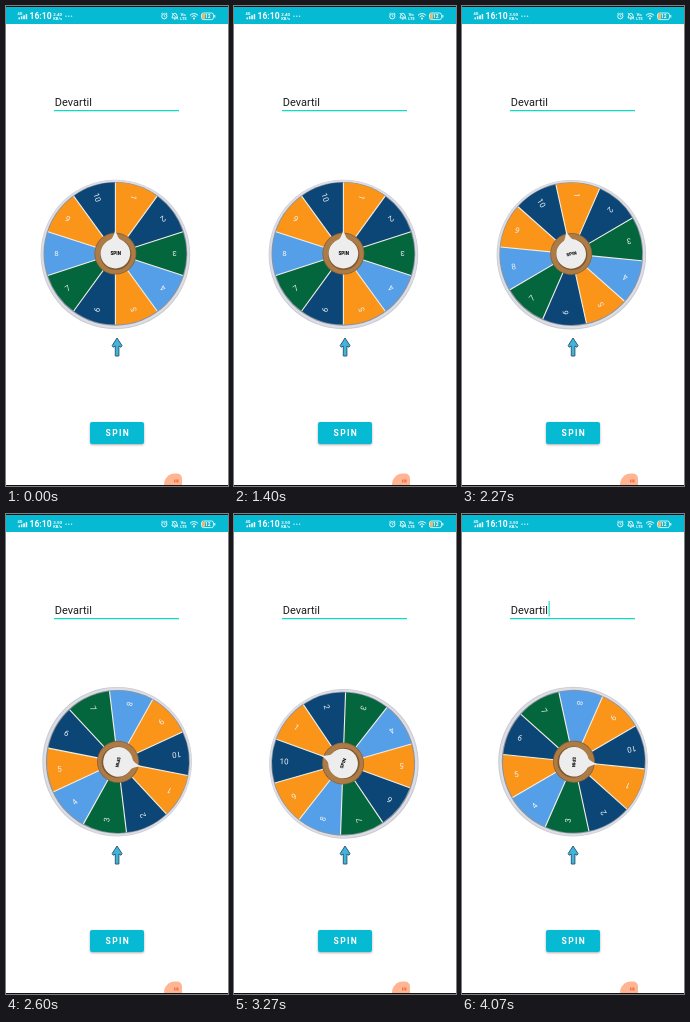
Animation, 222 px wide and 480 px high, one loop 4140 ms. Source, as an HTML page with a canvas:

```html
<!DOCTYPE html>
<html lang="en">
<head>
<meta charset="utf-8">
<title>Spin wheel</title>
<style>
  html, body { margin: 0; width: 100%; height: 100%; overflow: hidden; background: #fff; }
  canvas { display: block; width: 222px; height: 480px; }
</style>
</head>
<body>
<canvas id="stage"></canvas>
<script>
const W = 222, H = 480, LOOP = 4140, FPS = 15;
const CYAN = '#06bad4', TEAL = '#12d8c6';
const ORANGE = '#fa9519', NAVY = '#0b4676', GREEN = '#04663c', SKY = '#559fe8';
const SLICES = [ORANGE, NAVY, GREEN, SKY, ORANGE, NAVY, GREEN, SKY, ORANGE, NAVY];
const TAU = Math.PI * 2, RAD = Math.PI / 180;

const canvas = document.getElementById('stage');
const c = canvas.getContext('2d');
const dpr = window.devicePixelRatio || 1;
canvas.width = W * dpr;
canvas.height = H * dpr;

function disc(x, y, r, fill) {
  c.beginPath();
  c.arc(x, y, r, 0, TAU);
  c.fillStyle = fill;
  c.fill();
}

function rect(x, y, w, h, fill, r = 0) {
  c.beginPath();
  c.roundRect(x, y, w, h, r);
  c.fillStyle = fill;
  c.fill();
}

function line(points, stroke, width) {
  c.beginPath();
  points.forEach(([x, y]) => c.lineTo(x, y));
  c.strokeStyle = stroke;
  c.lineWidth = width;
  c.stroke();
}

function arc(x, y, r, from, to, stroke, width) {
  c.beginPath();
  c.arc(x, y, r, from * RAD, to * RAD);
  c.strokeStyle = stroke;
  c.lineWidth = width;
  c.stroke();
}

function text(str, x, y, size, fill, { weight = 400, align = 'left', gap = 0, base = 'alphabetic' } = {}) {
  c.font = `${weight} ${size}px Roboto, sans-serif`;
  c.textAlign = align;
  c.textBaseline = base;
  c.letterSpacing = gap + 'px';
  c.fillStyle = fill;
  c.fillText(str, x, y);
}

function statusBar(t) {
  const white = '#fff';
  rect(0, 0, W, 18, CYAN);
  rect(0, 0, W, 1, '#111');
  text('4G', 11.5, 9, 4, white, { weight: 700 });
  for (let i = 0; i < 4; i++) rect(12.5 + i * 2.4, 11.4 - i * 1.1, 1.5, 1.8 + i * 1.1, white);
  text('16:10', 23.5, 13.3, 8.6, white, { weight: 700 });
  text(t < 2000 ? '2.40' : '3.50', 47.3, 9.6, 4.4, white, { weight: 700 });
  text('KB/s', 47.3, 13.6, 4, white, { weight: 700 });
  for (let i = 0; i < 3; i++) disc(60 + i * 2.8, 10.2, 0.65, white);

  // alarm
  arc(158.3, 10.3, 2.6, 0, 360, white, 0.9);
  line([[158.3, 8.8], [158.3, 10.5], [159.5, 10.9]], white, 0.7);
  line([[155.3, 8], [156.7, 6.8]], white, 0.8);
  line([[161.3, 8], [159.9, 6.8]], white, 0.8);
  // muted bell
  c.beginPath();
  c.arc(168.8, 9.5, 2.1, Math.PI, 0);
  c.lineTo(171.6, 12);
  c.lineTo(166, 12);
  c.closePath();
  c.strokeStyle = white;
  c.lineWidth = 0.9;
  c.stroke();
  disc(168.8, 13, 0.8, white);
  line([[165.8, 7], [172.2, 13.5]], white, 0.8);
  // call over data
  text('Vo', 174.5, 9.6, 4.4, white, { weight: 700 });
  text('LTE', 174.3, 13.6, 4, white, { weight: 700 });
  // wifi
  arc(188, 13, 5.4, 222, 318, white, 1);
  arc(188, 13, 3.2, 222, 318, white, 1);
  disc(188, 12.6, 1, white);
  // battery
  c.beginPath();
  c.roundRect(195.5, 7, 12, 6.6, 2);
  c.strokeStyle = white;
  c.lineWidth = 0.8;
  c.stroke();
  rect(196.1, 7.6, 3, 5.4, '#f5b866', 1);
  rect(208.3, 9, 1, 2.6, white);
  text('12', 201.8, 12.1, 5, white, { weight: 700, align: 'center' });
}

function nameField(t) {
  text('Devartil', 48.7, 100, 11, '#1c1c1c');
  rect(48, 104, 125, 1.2, TEAL);
  const blink = Math.floor((t - 465) / 535);
  if (!(blink & 1)) rect(86.6, 87, 1.1, 15.5, TEAL);
}

// Decelerating 3.6 s spin, with a short stutter around t = 3000.
function wheelAngle(t) {
  if (t <= 1470) return 0;
  const u = Math.min((t - 1470) / 3600, 1);
  const lag = 20 * Math.exp(-(((t - 3000) / 390) ** 2));
  return 884.5 * (1 - (1 - u) ** 2) - lag;
}

function wheel(t) {
  c.save();
  c.translate(110.6, 248.8);
  c.rotate(wheelAngle(t) * RAD);
  c.translate(-1.2, -1.2);

  // rim, a little lower than the slices
  disc(0, 0.9, 74.8, '#cbccd4');
  disc(0, 0.5, 74, '#dcdde5');
  disc(0, 0.2, 71.9, '#8d949e');

  const step = TAU / 10;
  SLICES.forEach((fill, i) => {
    const a = i * step - Math.PI / 2;
    c.beginPath();
    c.moveTo(0, 0);
    c.arc(0, 0, 71, a, a + step);
    c.fillStyle = fill;
    c.fill();
  });
  for (let i = 0; i < 10; i++) {
    const a = i * step;
    line([[0, 0], [71 * Math.sin(a), -71 * Math.cos(a)]], '#f1eee4', 1.1);
  }
  for (let i = 0; i < 10; i++) {
    c.save();
    c.rotate((i + 0.5) * step);
    c.translate(0, -59);
    c.rotate(Math.PI / 2);
    text(String(i + 1), 0, 0.4, 8, '#eef3f4', { align: 'center', base: 'middle' });
    c.restore();
  }

  disc(0, 0, 21, '#8a6238');
  disc(0, 0, 20.2, '#ad7b45');
  disc(0.4, 0.8, 15.6, '#80592f');
  c.beginPath();
  c.moveTo(-6.5, -12);
  c.quadraticCurveTo(-1.6, -16, 0, -24);
  c.quadraticCurveTo(1.6, -16, 6.5, -12);
  c.fillStyle = '#ededed';
  c.fill();
  disc(0, 0, 14.8, '#ededed');
  text('SPIN', 0.3, 0.2, 4.6, '#111', { weight: 900, align: 'center', base: 'middle' });
  c.restore();
}

function arrow() {
  c.beginPath();
  [[111, 332], [116, 339.6], [115, 341.2], [112.9, 340], [112.9, 350], [109.3, 350],
   [109.3, 340], [107.2, 341.2], [106.2, 339.6]].forEach(([x, y]) => c.lineTo(x, y));
  c.closePath();
  c.fillStyle = '#42b4dc';
  c.fill();
  c.strokeStyle = '#2b5f78';
  c.lineWidth = 1;
  c.lineJoin = 'round';
  c.stroke();
}

function button(t) {
  const p = (t - 1400) / 500;
  const press = p > 0 && p < 1 ? Math.sin(p * Math.PI) : 0;
  c.save();
  c.shadowColor = 'rgba(0,0,0,.32)';
  c.shadowBlur = (2.5 + 3 * press) * dpr;
  c.shadowOffsetY = (1 + 1.5 * press) * dpr;
  rect(84, 416, 54, 22, CYAN, 2);
  c.restore();
  if (press) {
    c.save();
    c.beginPath();
    c.roundRect(84, 416, 54, 22, 2);
    c.clip();
    disc(111, 427, 8 + 30 * p, `rgba(255,255,255,${0.2 * press})`);
    c.restore();
  }
  text('SPIN', 99.6, 430.3, 8.5, '#fff', { weight: 700, gap: 1.3 });
}

function bottomEdge() {
  rect(158, 467.5, 18, 13, '#ffb592', [11, 5, 0, 0]);
  rect(168, 473.5, 1.5, 3, '#f0744c');
  rect(170.3, 473.5, 2.2, 3, '#f0744c');
  rect(0, 479, W, 1, '#111');
}

function draw(t) {
  c.setTransform(dpr, 0, 0, dpr, 0, 0);
  rect(0, 0, W, H, '#fff');
  statusBar(t);
  nameField(t);
  wheel(t);
  arrow();
  button(t);
  bottomEdge();
}

const start = performance.now();
function tick() {
  const t = (performance.now() - start) % LOOP;
  draw(Math.floor(t * FPS / 1000 + 0.06) * 1000 / FPS);
  requestAnimationFrame(tick);
}
tick();
</script>
</body>
</html>
```
